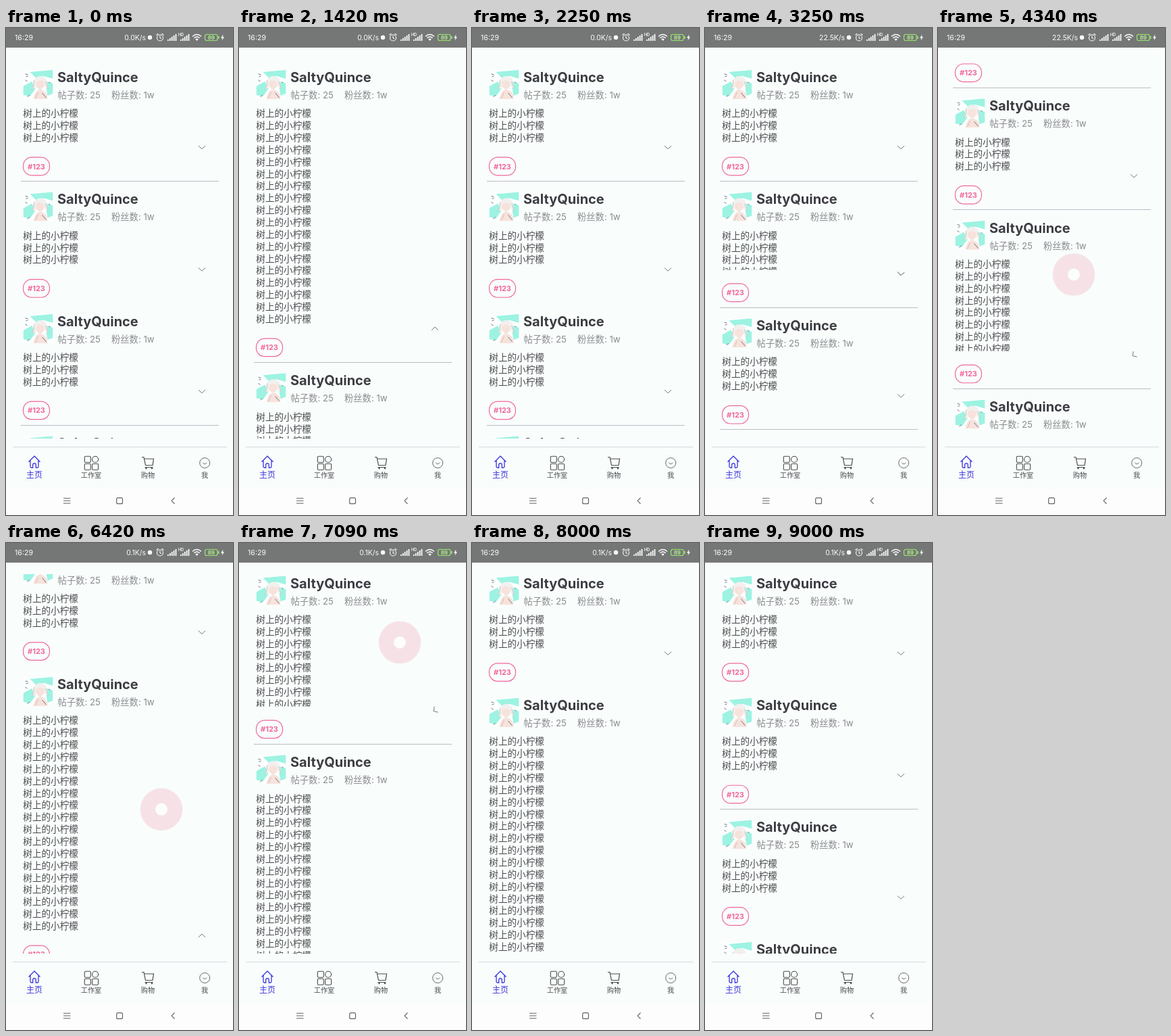
An HTML page with a canvas for the animation above (9.08 s loop, 336 px wide and 720 px high).

```html
<!DOCTYPE html>
<html lang="zh-CN">
<head>
<meta charset="utf-8">
<title>Expandable posts</title>
<style>
  html, body { margin: 0; width: 100%; height: 100%; overflow: hidden; background: #f9fdfc; }
  canvas { display: block; width: 336px; height: 720px; }
</style>
</head>
<body>
<canvas id="stage" width="336" height="720"></canvas>
<script>
const ctx = document.getElementById('stage').getContext('2d');
const LOOP = 9080, FPS = 12;
const FONT = 'Inter, "Noto Sans CJK SC", "Noto Sans CJK", sans-serif';
const BG = '#f9fdfc', INK = '#4a4b4e', GREY = '#8b8c8f', BLUE = '#3a35dc', RED = '#f2679c';
const PINK = '#f6dfe3';
const PITCH = 180.44, LINE = 17.86, MORE_LINES = 15;
const TOGGLE = 300;

const taps = [
  { at: 850, card: 0, open: 1, x: 200, y: 145 },
  { at: 1700, card: 0, open: 0, x: 202, y: 160 },
  { at: 2400, card: 1, open: 1, x: 200, y: 325 },
  { at: 2977.4, card: 1, open: 0, x: 203, y: 330 },
  { at: 4227.9, card: 2, open: 1, x: 201, y: 364.5 },
  { at: 4790, card: 2, open: 0, x: 203, y: 366 },
  { at: 5351.7, card: 1, open: 1, x: 222, y: 178 },
  { at: 6977.9, card: 0, open: 1, x: 238, y: 147 },
  { at: 7540, card: 0, open: 0, x: 236, y: 149 },
  { at: 8150, card: 1, open: 0, x: 234, y: 310 }
];
const drags = [
  { at: 3450, length: 400, by: 138.2, x: 200, y: 480 },
  { at: 6150, length: 400, by: -124.8, x: 230, y: 300 }
];

function ease(u) {
  u = Math.min(1, Math.max(0, u));
  return u * u * (3 - 2 * u);
}

function openness(card, t) {
  const tap = taps.filter(p => p.card === card && p.at <= t).pop();
  if (!tap) return 0;
  const p = ease((t - tap.at) / TOGGLE);
  return tap.open ? p : 1 - p;
}

function text(str, x, y, size, color, weight = 400, align = 'left') {
  ctx.font = `${weight} ${size}px ${FONT}`;
  ctx.fillStyle = color;
  ctx.textAlign = align;
  ctx.fillText(str, x, y);
}

function stroke(d, color, width = 1) {
  ctx.strokeStyle = color;
  ctx.lineWidth = width;
  ctx.stroke(new Path2D(d));
}

function fill(d, color) {
  ctx.fillStyle = color;
  ctx.fill(new Path2D(d));
}

function rect(x, y, w, h, color) {
  ctx.fillStyle = color;
  ctx.fillRect(x, y, w, h);
}

function roundRect(x, y, w, h, r, color, width = 1) {
  ctx.beginPath();
  ctx.roundRect(x, y, w, h, r);
  ctx.strokeStyle = color;
  ctx.lineWidth = width;
  ctx.stroke();
}

function disc(x, y, r, color) {
  ctx.beginPath();
  ctx.arc(x, y, r, 0, 7);
  ctx.fillStyle = color;
  ctx.fill();
}

function at(x, y, draw) {
  ctx.save();
  ctx.translate(x, y);
  draw();
  ctx.restore();
}

function clipTo(x, y, w, h, draw) {
  ctx.save();
  ctx.beginPath();
  ctx.rect(x, y, w, h);
  ctx.clip();
  draw();
  ctx.restore();
}

function avatar() {
  clipTo(0, 0, 44, 43, () => {
    rect(0, 0, 44, 43, '#fcffff');
    fill('M10 3L44 0V13L30 9L19 12ZM0 24L13 17L18 28L10 39L0 37ZM32 16L44 20V35L36 38Z', '#9df3e2');
    fill('M17 13Q25 5 34 13L37 28L31 24L20 25L13 29Z', '#f1f0ee');
    fill('M19 18Q25 13 31 18Q32 27 25 29Q18 27 19 18ZM15 43Q18 28 26 29Q36 31 36 43Z', '#f7e2dc');
    stroke('M3 6l4 1M4 10l3 -1M3 15l3 2M38 18l2 1M6 40l3 -3M28 34l6 7', '#6d7478');
    stroke('M13 29Q17 22 16 15M37 28L33 17M18 42l4-9', '#cbb3ae', .8);
  });
}

function separator(y) {
  // A hairline thinner than a pixel only shows where it covers a row's centre.
  const row = Math.ceil(y - .5);
  if (row + .5 < y + .62) rect(22, row, 293, 1, '#bcbdc4');
}

function card(top, open) {
  const extra = open * MORE_LINES * LINE;
  at(25.5, top + 62, avatar);
  text('SaltyQuince', 76, top + 80, 20, '#3d3d43', 700);
  text('帖子数: 25', 76.5, top + 104, 13.3, GREY);
  text('粉丝数: 1w', 156, top + 104, 13.3, GREY);
  clipTo(20, top + 117.3, 280, 3 * LINE + extra, () => {
    const lines = 3 + Math.ceil(extra / LINE);
    for (let i = 0; i < lines; i++) text('树上的小柠檬', 25.3, top + 131.3 + i * LINE, 13.6, INK);
  });
  at(290, top + 176.5 + extra, () => {
    ctx.rotate(open * Math.PI);
    stroke('M-5 -2.3L0 2.3L5 -2.3', '#77787a');
  });
  roundRect(25.5, top + 191.2 + extra, 39, 26.6, 12.5, RED, 1.2);
  text('#123', 45, top + 208.5 + extra, 11, RED, 700, 'center');
  separator(top + 226.15 + extra);
}

function list(t) {
  const scroll = drags.reduce((sum, d) => sum + d.by * ease((t - d.at) / d.length), 0);
  clipTo(0, 46, 336, 561, () => {
    let top = -scroll;
    for (let i = 0; i < 6 && top < 560; i++) {
      const open = openness(i, t);
      card(top, open);
      top += PITCH + open * MORE_LINES * LINE;
    }
  });
}

function statusBar(t) {
  const white = '#fafcfc', green = '#96ea6c';
  rect(0, 0, 336, 29, '#757776');
  text('16:29', 13, 17.8, 10.6, white);
  text(t < 2300 ? '0.0K/s' : t < 6300 ? '22.5K/s' : '0.1K/s', 207, 17.8, 10.4, white, 400, 'right');
  disc(213, 14, 3.2, white);
  stroke('M223.5 14.5a4.5 4.5 0 1 0 9 0a4.5 4.5 0 1 0 -9 0M228 11.5v3.2l2 1M222.5 10.5l3 -2.3M233.5 10.5l-3 -2.3', white, 1.1);
  for (const x of [239, 258]) {
    for (let i = 0; i < 5; i++) rect(x + i * 2.9, 17 - i * 2, 1.8, 2 + i * 2, white);
  }
  text('HD', 255, 12, 5.5, white, 600);
  stroke('M276 12.5Q282.5 6.5 289 12.5M278.3 14.8Q282.5 11 286.7 14.8', white, 1.4);
  fill('M280.2 16.5Q282.5 14.5 284.8 16.5L282.5 19Z', white);
  roundRect(294.5, 9.5, 18.5, 9, 2.5, green, 1.2);
  rect(314, 12, 1.5, 4, green);
  text('89', 303.8, 17, 8, '#b4f58f', 600, 'center');
  fill('M321.5 9.5L318 14.8H320.2L319.5 18.5L323 13.2H320.8Z', white);
}

function navigation() {
  rect(10, 619, 317, 1, '#d8dadd');
  stroke('M33.5 641.5L42 633L50.5 641.5M36 639.5V648.5Q36 650 37.5 650H39.7V645Q42 642 44.3 645V650H46.5Q48 650 48 648.5V639.5', BLUE, 1.3);
  for (const [x, y, r] of [[116.3, 633.3, 1.5], [127.6, 633.3, 4.5], [116.3, 644.3, 1.5], [127.6, 644.3, 1.5]]) {
    roundRect(x, y, 9, 9, r, INK, 1.1);
  }
  stroke('M201 634.5H204L206.5 646.5H217L218.5 637H204.6M205.5 649.5H217.5', INK, 1.2);
  disc(207.5, 651, 1.2, INK);
  disc(216, 651, 1.2, INK);
  stroke('M286.7 643a7.5 7.5 0 1 0 15 0a7.5 7.5 0 1 0 -15 0M291.2 642.7Q294.2 646.3 297.2 642.7', '#69696c', 1);
  text('主页', 42, 665, 12, BLUE, 400, 'center');
  text('工作室', 126, 665, 10.2, INK, 400, 'center');
  text('购物', 210, 665, 10.2, INK, 400, 'center');
  text('我', 294, 665, 10.2, INK, 400, 'center');

  rect(0, 681, 336, 39, '#fdfdfd');
  stroke('M85 695.2H95.5M85 699H95.5M85 702.8H95.5M249.5 694.5L245 699L249.5 703.5', '#646466', 1.1);
  roundRect(163.7, 694.6, 8.8, 8.8, 2, '#646466', 1.2);
}

function finger(x, y) {
  ctx.globalAlpha = .88;
  disc(x, y, 31.3, PINK);
  ctx.globalAlpha = 1;
  disc(x, y, 9, '#fcfdfd');
}

function touches(t) {
  for (const p of taps) {
    if (t > p.at - 90 && t < p.at + 140) finger(p.x, p.y);
  }
  for (const d of drags) {
    const u = (t - d.at) / d.length;
    if (u > 0 && u < 1) finger(d.x, d.y - d.by * ease(u));
  }
}

function render(now) {
  const tick = Math.floor((now % LOOP) * FPS / 1000);
  const t = Math.ceil(tick * 100 / FPS) * 10;
  rect(0, 0, 336, 720, BG);
  list(t);
  statusBar(t);
  navigation();
  touches(t);
}

const start = performance.now();
function loop() {
  render(performance.now() - start);
  requestAnimationFrame(loop);
}
loop();
</script>
</body>
</html>
```
